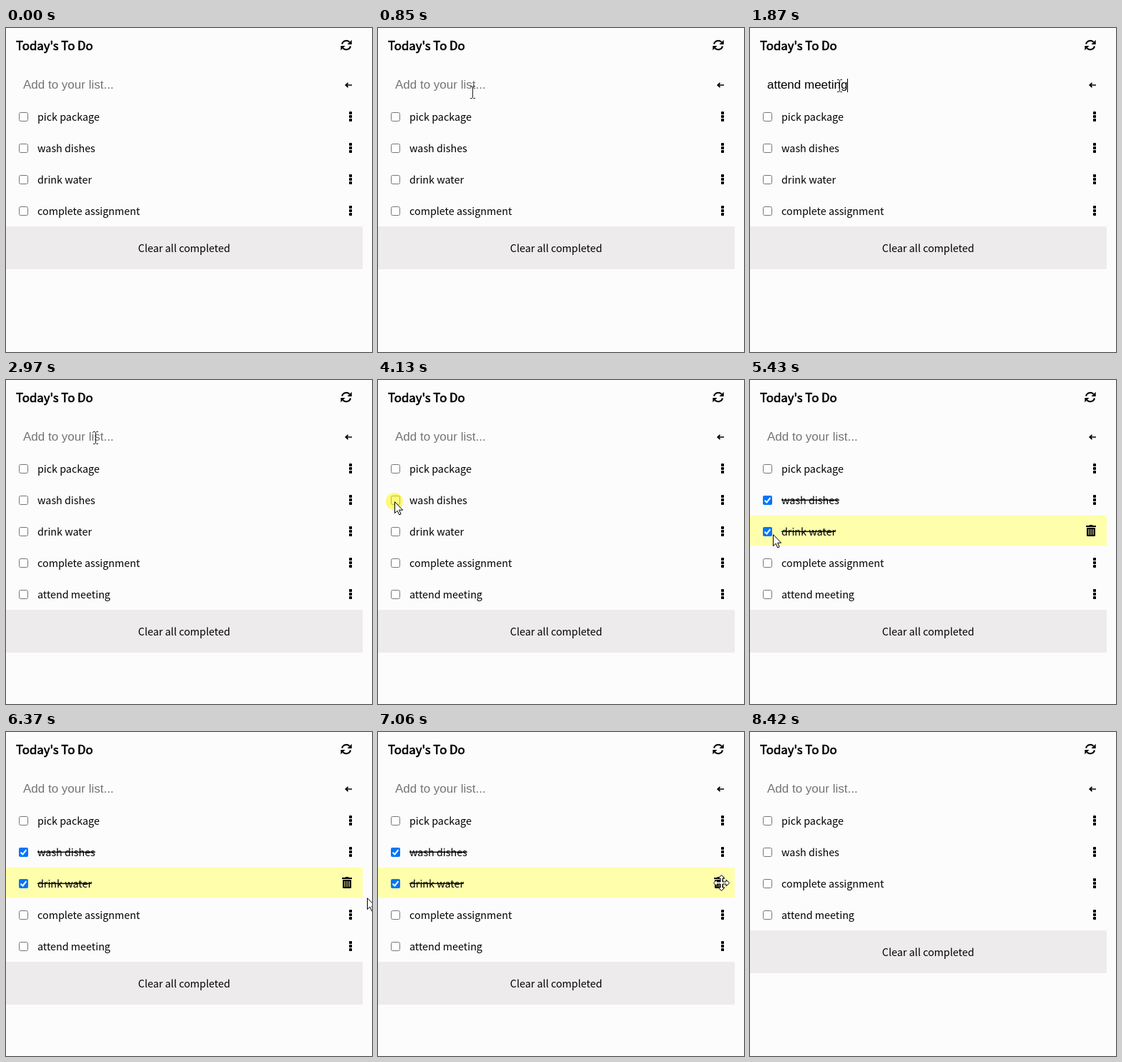
These frames come from a looping animation (512 by 454 pixels, 9100 ms). An HTML page:

```html
<!DOCTYPE html>
<html lang="en">
<head>
<meta charset="utf-8">
<title>Today's To Do</title>
<style>
  html, body { margin: 0; width: 100%; height: 100%; overflow: hidden; background: #fcfcfc; }
  svg { display: block; }
  text { white-space: pre; }
  .ui { font: 400 14.32px "Noto Sans CJK JP", "Noto Sans CJK SC", "Noto Sans CJK", "Noto Sans", sans-serif; }
  .title { font-size: 16.75px; stroke: #000; stroke-width: .65px; }
  .field { font: 17px "Liberation Sans", Arial, sans-serif; }
  .done { text-decoration: line-through; }
</style>
</head>
<body>
<svg width="512" height="454" viewBox="0 0 512 454">
  <defs>
    <g id="dots">
      <rect x="480" y="15" width="4" height="4" rx=".8"/>
      <rect x="480" y="20" width="4" height="4" rx=".8"/>
      <rect x="480" y="25" width="4" height="4" rx=".8"/>
    </g>
    <g id="trash">
      <path d="M470 15.5V14.5q0-.5.5-.5H474.2L475 13.3q.3-.3.7-.3h2.6q.4 0 .7.3l.8.7h3.7q.5 0 .5.5v1.5H470Z"/>
      <path d="M471 17H483V27.5Q483 29 481.5 29H472.5Q471 29 471 27.5Z"/>
      <path d="M474 19.5V26.5M477 19.5V26.5M480 19.5V26.5" stroke="#ffffab" stroke-linecap="round"/>
    </g>
    <g id="box">
      <rect x="18.5" y="16.5" width="12" height="12" rx="2" fill="#fff" stroke="#767676"/>
    </g>
    <g id="checked">
      <rect x="18" y="16" width="13" height="13" rx="2" fill="#0075ff"/>
      <path d="M20.6 22.7L23.4 25.4L28.4 19.2" fill="none" stroke="#fff" stroke-width="2"/>
    </g>
    <path id="turn" d="M470 22.6A6.2 6.2 0 0 1 480.6 19.8" fill="none" stroke="#000" stroke-width="2"/>
    <path id="tip" d="M483.7 16.8V23H477.5Z"/>
  </defs>
  <rect width="512" height="454" fill="#fcfcfc"/>
  <text class="ui title" x="14" y="31">Today's To Do</text>
  <g id="sync">
    <use href="#turn"/><use href="#tip"/>
    <g transform="rotate(180 476 24)"><use href="#turn"/><use href="#tip"/></g>
  </g>
  <text id="field" class="field" x="24" y="85"></text>
  <rect id="caret" y="71" width="1" height="19"/>
  <path d="M484 80H476M478.5 77L475.2 80L478.5 83" fill="none" stroke="#000" stroke-width="1.7"/>
  <g id="list"></g>
  <g id="clear">
    <path d="M0 0H497Q499 0 499 2V58Q499 60 497 60H0Z" fill="#edebec"/>
    <text class="ui" x="249.2" y="36" text-anchor="middle">Clear all completed</text>
  </g>
  <circle id="press" r="12" fill="#fff500" fill-opacity=".52"/>
  <g id="arrow">
    <path d="M.5 .7V16.6L4.2 13.2L6.7 18.9L9.1 17.9L6.6 12.2H11.6Z" fill="#fff" stroke="#000"/>
  </g>
  <g id="beam">
    <path d="M-3 -7.5H-.5L.5 -6.5L1.5 -7.5H4M.5 -6.5V8.5M-3 9.5H-.5L.5 8.5L1.5 9.5H4" fill="none" stroke="#222"/>
  </g>
  <g id="move">
    <path id="cross" fill="#fff" stroke="#000" stroke-linejoin="round"/>
  </g>
</svg>
<script>
const LOOP = 9100;
const $ = id => document.getElementById(id);
const between = (t, a, b) => t >= a && t < b;
const show = (id, on) => $(id).setAttribute('display', on ? 'inline' : 'none');
const place = (id, x, y) => $(id).setAttribute('transform', `translate(${x} ${y})`);

// four-headed pointer: one arm, turned three times
const arm = [[-1.5, -1.5], [-1.5, -6.5], [-4.5, -6.5], [0, -11], [4.5, -6.5], [1.5, -6.5]];
const turned = ([x, y], n) => n ? turned([-y, x], n - 1) : [x, y];
$('cross').setAttribute('d', 'M' + [0, 1, 2, 3]
  .flatMap(n => arm.map(p => turned(p, n).join(' '))).join('L') + 'Z');

// pointer paths: start, end, steps, from, to, ease in and out
const moves = [
  [150, 920, 11, [419, 446], [125, 80], true],
  [3380, 4062, 10, [125, 83], [23, 170], true],
  [4340, 4891, 8, [23, 171], [26, 216], true],
  [5370, 6160, 12, [32, 216], [513, 238], true],
  [6370, 6922, 8, [505, 232], [480, 212], true],
  [7940, 8420, 7, [479, 216], [436, 455], false]
];
const presses = [[990, 1120], [4130, 4340], [4891, 5030], [6922, 7060]];
const carets = [[990, 1590], [1870, 2970], [3500, 4030]];

function pointer(t) {
  const m = moves.filter(m => t >= m[0]).pop();
  if (!m) return null;
  const [a, b, n, from, to, eased] = m;
  let k = Math.min(1, Math.floor((t - a) / (b - a) * n + .02) / n);
  if (eased) k = k * k * (3 - 2 * k);
  return from.map((v, i) => Math.round(v + (to[i] - v) * k));
}

function items(t) {
  if (t < 2470) return ['pick package', 'wash dishes', 'drink water', 'complete assignment'];
  if (t < 7550) return ['pick package', 'wash dishes', 'drink water', 'complete assignment', 'attend meeting'];
  return ['pick package', 'wash dishes', 'complete assignment', 'attend meeting'];
}

function row(name, i, t) {
  const live = t < 7550;
  const done = live && (name === 'wash dishes' && t >= 4340 || name === 'drink water' && t >= 5030);
  const active = done && (name === 'drink water' || t < 5030);
  return `<g transform="translate(0 ${102 + 44 * i})">
    ${active ? '<rect width="499" height="42" fill="#ffffab"/>' : ''}
    <use href="#${done ? 'checked' : 'box'}"/>
    <text class="ui${done ? ' done' : ''}" x="44" y="28">${name}</text>
    <use href="#${active ? 'trash' : 'dots'}"/></g>`;
}

let last = '';
function drawList(t) {
  const names = items(t);
  const html = names.map((name, i) => row(name, i, t)).join('');
  if (html === last) return;
  $('list').innerHTML = last = html;
  place('clear', 0, 102 + 44 * names.length);
}

function render(t) {
  drawList(t);

  const typed = between(t, 1870, 2470);
  $('field').textContent = typed ? 'attend meeting' : 'Add to your list...';
  $('field').setAttribute('fill', typed ? '#000' : '#757575');
  $('caret').setAttribute('x', typed ? 136 : 24);
  show('caret', carets.some(c => between(t, ...c)));

  const p = pointer(t);
  const seen = p && !between(t, 6160, 6370) && t < 8420;
  const beam = seen && p[1] > 62 && p[1] < 98;
  const move = seen && between(t, 6922, 7550);
  show('beam', beam);
  show('move', move);
  show('arrow', seen && !beam && !move);
  show('press', seen && presses.some(c => between(t, ...c)));
  if (!p) return;
  ['beam', 'arrow'].forEach(id => place(id, ...p));
  place('move', p[0] + .5, p[1] - .5);
  place('press', ...p);
}

const start = performance.now();
function frame() {
  render((performance.now() - start) % LOOP);
  requestAnimationFrame(frame);
}
render(0);
requestAnimationFrame(frame);
</script>
</body>
</html>
```
